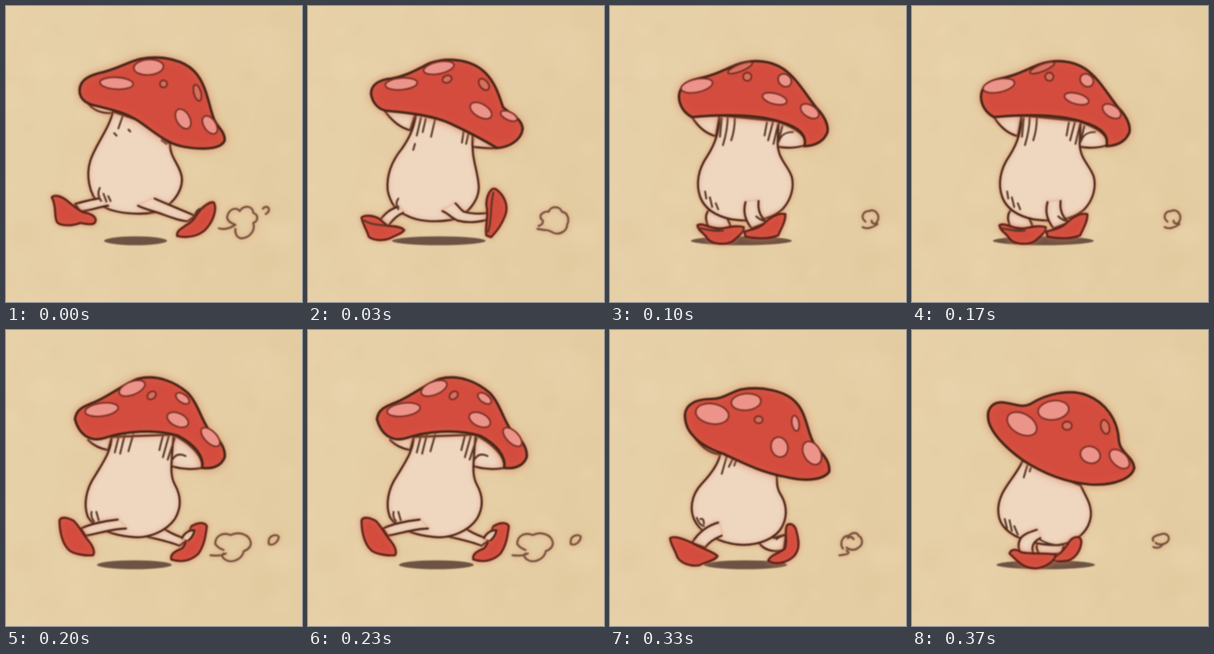
Write an HTML page with a canvas that moves like this. It is 498 px wide and 498 px high and loops after 410 ms.

```html
<!DOCTYPE html>
<html>
<head>
<meta charset="utf-8">
<title>Running mushroom</title>
<style>
html, body { margin: 0; width: 100%; height: 100%; overflow: hidden; background: #e6cfa6; }
canvas { display: block; filter: blur(.8px); }
</style>
</head>
<body>
<canvas id="stage" width="498" height="498"></canvas>
<script>
const SIZE = 498, LOOP = 410;
const INK = '#452417', RED = '#d44c3e', PINK = '#ec948a', SKIN = '#efd6bf';
const ctx = document.getElementById('stage').getContext('2d');
ctx.lineCap = ctx.lineJoin = 'round';

function shape(d, fill, width, ink = INK, glow = 0) {
  const path = new Path2D(d);
  ctx.save();
  ctx.shadowColor = 'rgba(218, 120, 84, .6)';
  ctx.shadowBlur = glow;
  if (fill) { ctx.fillStyle = fill; ctx.fill(path); }
  ctx.lineWidth = width;
  ctx.strokeStyle = ink;
  ctx.stroke(path);
  ctx.restore();
}
function oval(x, y, rx, ry, deg, fill, ink) {
  ctx.beginPath();
  ctx.ellipse(x, y, rx, ry, deg * Math.PI / 180, 0, 7);
  ctx.fillStyle = fill;
  ctx.fill();
  if (ink) { ctx.strokeStyle = ink; ctx.lineWidth = 2.8; ctx.stroke(); }
}
const shadow = (x, r) => oval(x, 395, r, 7.5, 0, '#6d5343');
const puff = d => shape(d, null, 3.4, '#71503c', 8);
const skin = d => shape(d, SKIN, 3.4, INK, 7);
const shoe = d => shape(d, RED, 3.6, '#5c2119', 10);
const cap = d => shape(d, RED, 4.2, INK, 13);
const lines = d => shape(d, null, 3.2, '#573526');
const spot = (x, y, rx, ry, deg = 0) => oval(x, y, rx - 1, ry - 1, deg, PINK, '#7c2f24');
const dot = (x, y, rx, ry, deg = 0) => oval(x, y, rx - 1, ry - 1, deg, '#d8705f', '#742d22');

function leap() {
  shadow(218, 53);
  puff('M372 355C375 340 388 338 393 345C400 335 415 335 416 348C426 352 424 362 416 365C420 378 410 390 396 391C388 390 385 382 386 375M358 374C370 378 380 372 386 368C380 366 372 362 372 355M432 341q6-6 10-1q2 6-5 10');
  skin('M138 164C148 176 160 181 178 180L184 174');
  skin('M180 178C174 205 150 235 142 260C134 285 140 318 158 334C180 350 225 352 250 347C275 340 297 315 296 290C294 268 275 255 276 232L230 195Z');
  skin('M222 336C230 340 240 343 250 346C270 352 290 362 306 362L318 353C300 345 275 335 250 324');
  skin('M155 324C140 326 128 330 116 333L125 345C140 345 155 338 172 336');
  shoe('M77 322C80 317 92 319 102 327C112 335 120 343 130 347C142 349 151 353 151 361C150 369 140 368 125 365C110 371 92 370 86 364C80 354 86 338 77 322Z');
  shoe('M350 331C355 340 350 358 340 371C328 388 305 391 288 387C286 378 296 374 304 368C318 362 320 348 332 338C340 332 346 328 350 331Z');
  lines('M318 354C318 344 326 340 332 340M196 186l-7 20M182 214l4 4M206 208l3 3M158 306q-6 10 2 22M164 316l5 13M172 320l4 8M262 226l8 6');
  cap('M124 146C122 128 134 119 156 113C185 107 205 94 226 89C265 82 300 92 317 110C336 130 340 160 348 185C353 203 369 210 368 226C363 240 335 243 300 237C270 232 250 212 222 193C200 179 180 175 152 168C136 165 126 158 124 146Z');
  spot(186, 130, 29, 11, 3);
  spot(240, 103, 26, 14, -4);
  dot(265, 131, 7, 7);
  dot(322, 146, 7, 15, -15);
  spot(298, 190, 12, 19, -30);
  spot(343, 200, 11, 18, -35);
}

function land() {
  shadow(220, 79);
  puff('M388 370C395 368 398 362 392 358C388 350 398 345 405 346C408 336 424 336 427 346C438 348 440 360 436 368C436 380 422 385 414 382C408 380 406 376 398 377L386 375');
  skin('M128 175C140 192 155 205 172 209L180 183');
  skin('M278 237C290 238 305 240 318 239L284 217');
  skin('M182 182C178 205 172 220 158 240C140 262 132 285 134 310C138 330 148 345 165 352C185 363 215 364 240 360C268 354 290 325 287 300C285 275 274 255 277 217L240 195Z');
  skin('M152 338C140 340 128 350 120 362L135 370C142 360 150 352 160 348');
  skin('M226 345C235 348 240 356 252 361C270 366 288 363 300 360L304 348C290 350 275 350 262 346C256 342 252 335 248 332');
  shoe('M90 356C95 351 110 352 120 358L134 370C145 370 158 372 162 377C158 384 145 386 138 391C125 396 108 394 102 388C100 378 92 368 90 356Z');
  shoe('M300 386C297 370 305 355 300 335C300 318 308 304 316 308C330 318 338 335 332 352C326 368 315 382 308 389Z');
  lines('M95 361C105 368 120 368 134 370M303 380C310 360 306 335 312 314M190 188l-7 30M180 232l-3 10M198 190l-5 22M214 190l-7 30M262 210l-3 20M270 214l-4 18M152 324q-6 8 0 18');
  cap('M106 148C106 132 120 124 140 122C165 118 185 106 205 96C240 84 278 92 298 112C316 130 322 152 328 170C340 182 362 190 361 208C358 226 338 238 318 239C300 228 270 212 240 198C205 182 165 180 130 176C115 172 108 160 106 148Z');
  spot(157, 131, 28, 11, -5);
  spot(220, 104, 27, 11, -12);
  dot(234, 123, 9, 7, -20);
  dot(296, 132, 8, 12, -40);
  spot(291, 176, 21, 12, 30);
  spot(338, 185, 16, 8, 25);
}

function gather() {
  shadow(221, 85);
  puff('M430 363C421 356 425 345 436 345C446 340 455 352 450 362C447 369 440 366 440 361M450 367C442 373 432 376 425 372');
  skin('M138 187C148 203 162 215 178 219L184 186');
  skin('M284 237C300 240 318 238 328 234C332 216 308 204 278 193');
  skin('M165 345C160 352 160 360 166 372L204 376C202 366 200 362 196 356');
  skin('M184 184C184 210 178 230 164 252C148 275 144 300 152 322C160 342 180 354 205 359C240 364 270 360 290 342C305 326 310 305 306 288C300 268 282 258 282 230L284 194Z');
  skin('M228 330C224 345 226 358 238 374L264 364C254 356 248 345 250 328');
  shoe('M147 369C154 364 165 372 182 375C198 373 212 368 225 372C227 380 215 388 206 396C192 403 170 401 163 390C158 382 148 378 147 369Z');
  shoe('M226 380C235 376 247 376 258 367C267 358 282 347 295 350C296 362 288 374 283 386C268 392 245 392 228 388Z');
  lines('M150 374C164 376 176 380 190 378M262 362q-10-2-16-8M188 188l-3 32M198 186q0 22-8 48M210 188q0 20-6 38M264 196l-4 22M274 196l-8 30M283 198l-8 34M290 202l-6 24M284 228C288 216 296 212 308 212M168 322l4 16M178 332l4 10M160 312l2 12');
  cap('M116 152C117 135 128 126 148 122C172 118 190 108 212 99C240 88 272 92 292 106C315 122 330 150 348 172C360 184 368 200 366 212C360 228 345 235 327 236C332 218 318 204 290 196C250 182 190 182 138 187C124 180 116 166 116 152Z');
  spot(146, 134, 28, 12, -12);
  dot(219, 104, 23, 7, -22);
  dot(231, 119, 8, 8);
  spot(294, 125, 13, 11, 40);
  spot(277, 156, 22, 10, 15);
  spot(336, 177, 18, 11, 32);
}

function bound() {
  shadow(216, 63);
  puff('M352 360C352 345 366 340 378 345C392 338 410 344 412 358C412 366 406 370 400 372C398 384 384 392 372 388C364 384 362 380 366 376M352 360C356 366 360 368 366 370M344 379C355 380 362 380 370 376M442 355C442 346 456 342 459 348C458 356 450 364 442 360Z');
  skin('M138 185C148 195 160 200 172 202L178 179');
  skin('M278 229C295 234 315 235 330 232C332 210 305 188 280 176');
  skin('M238 348C255 352 275 356 292 363L306 352C290 348 278 342 268 336');
  skin('M178 180C176 205 165 220 150 245C134 268 130 295 138 315C150 335 180 345 210 348C240 352 270 338 284 318C296 298 294 278 284 260C276 245 278 230 280 200L282 176Z');
  skin('M188 319C170 321 145 325 126 334L134 346C155 343 178 334 202 334');
  shoe('M90 320C93 313 105 316 114 321C125 332 130 345 140 356C148 366 150 376 146 379C135 380 118 378 108 372C95 362 90 340 90 320Z');
  shoe('M278 386C276 378 284 372 295 368C304 362 304 345 312 330C322 324 334 322 338 330C336 345 334 362 324 376C312 388 295 392 278 386Z');
  skin('M296 350C300 342 308 336 317 337C316 344 312 350 307 354');
  lines('M190 178l-7 28M200 176l-8 32M214 176l-8 28M264 178l-6 24M274 178l-10 36M284 182l-12 36M280 218C286 208 294 208 302 212M144 306q-2 8 4 16M152 306l4 14');
  cap('M116 150C118 132 132 128 152 120C178 108 200 90 222 82C255 74 285 88 305 105C322 122 328 148 340 166C356 180 370 198 368 214C362 230 346 234 330 232C334 212 316 192 290 178C250 166 200 170 165 182C145 188 124 180 116 150Z');
  spot(161, 134, 29, 12, -8);
  spot(212, 98, 24, 12, -22);
  dot(245, 110, 9, 7, -40);
  spot(297, 115, 14, 8, 35);
  spot(289, 151, 20, 12, 25);
  spot(344, 180, 21, 11, 45);
}

function step() {
  shadow(228, 70);
  puff('M386 379C398 378 406 376 398 371M392 368C386 360 390 346 402 346C408 340 416 340 418 346C426 350 426 362 418 366C412 372 402 370 398 366M400 350q6-4 10 2');
  skin('M142 180C152 195 166 206 182 209L188 204');
  skin('M250 357C258 370 275 375 292 370L296 344L275 350');
  skin('M186 206C184 222 172 240 155 258C136 278 132 305 145 325C155 342 185 358 215 361C250 364 280 350 290 330C300 310 296 290 286 275C279 262 282 255 280 243L230 225Z');
  skin('M182 324C168 328 150 338 138 358L160 366C168 355 178 350 188 346');
  shoe('M101 350C108 346 120 350 138 358C150 366 172 372 181 380C178 388 160 390 150 396C135 398 120 393 113 382C110 370 102 362 101 350Z');
  shoe('M266 388C270 378 284 376 294 368C300 355 292 338 298 328C304 324 312 328 314 340C318 355 320 368 310 380C298 392 278 396 266 388Z');
  lines('M196 214l-8 28M206 218l-6 12M212 220l-3 8M146 316q4 12 12 14M152 318q6-2 6 8M280 352q8-6 14-6');
  cap('M126 142C128 124 146 116 170 116C190 116 200 106 220 100C255 94 295 102 313 122C332 142 332 175 344 192C356 208 370 218 369 238C360 252 330 256 295 247C255 240 220 222 190 208C165 200 148 188 140 178C130 168 126 155 126 142Z');
  spot(172, 141, 29, 18, 10);
  spot(229, 121, 26, 15, -5);
  dot(250, 151, 8, 7);
  spot(312, 157, 7, 14, -10);
  spot(285, 197, 15, 18, -15);
  spot(340, 207, 15, 22, -30);
}

function tuck() {
  shadow(225, 83);
  puff('M406 355C402 348 412 345 418 344C428 340 436 348 430 356C424 362 414 362 410 358M422 361C418 366 412 368 406 365');
  skin('M214 352C208 360 208 370 216 378L252 376L256 358');
  skin('M186 220C178 240 162 255 152 275C142 295 142 320 158 335C175 352 210 362 245 362C275 358 298 340 301 312C302 292 292 280 284 262L230 240Z');
  skin('M210 336C198 340 186 344 182 352C178 360 178 368 184 378L204 376C200 364 204 356 216 350');
  shoe('M236 386C244 380 256 372 266 354C274 346 284 346 285 356C284 370 276 384 262 388C250 390 244 390 236 386Z');
  shoe('M164 376C166 368 176 368 184 374C205 378 225 374 242 378C240 388 228 398 210 401C190 402 180 392 164 376Z');
  lines('M194 228l-6 20M200 232l-2 6M156 318l4 16M164 320l4 18M172 330l6 14M214 352q16 10 36 10');
  cap('M128 148C126 130 138 120 155 122C172 124 185 132 200 124C225 108 265 98 295 110C325 122 346 150 348 185C350 208 372 212 374 232C370 250 340 262 300 260C255 256 215 238 185 218C160 200 130 172 128 148Z');
  spot(185, 158, 28, 18, 30);
  spot(238, 135, 27, 17, -8);
  dot(261, 161, 9, 8);
  dot(325, 163, 8, 13, -15);
  spot(300, 210, 18, 15, 20);
  spot(349, 217, 21, 13, 42);
}

// Old paper: warm gradient with soft seeded blotches.
function paper() {
  const wash = ctx.createLinearGradient(0, 0, SIZE, SIZE * .3);
  wash.addColorStop(0, '#e7d1a9');
  wash.addColorStop(1, '#e5cda3');
  ctx.fillStyle = wash;
  ctx.fillRect(0, 0, SIZE, SIZE);
  let seed = 7;
  const random = () => (seed = seed * 16807 % 2147483647) / 2147483647;
  for (let i = 0; i < 90; i++) {
    const x = random() * SIZE, y = random() * SIZE, r = 12 + random() * 30;
    const tone = i % 2 ? '240, 220, 184' : '218, 192, 146';
    const blot = ctx.createRadialGradient(x, y, 0, x, y, r);
    blot.addColorStop(0, `rgba(${tone}, .15)`);
    blot.addColorStop(1, `rgba(${tone}, 0)`);
    ctx.fillStyle = blot;
    ctx.fillRect(x - r, y - r, 2 * r, 2 * r);
  }
}

function poseAt(t) {
  if (t < 30) return leap;
  if (t < 100) return land;
  if (t < 200) return gather;
  if (t < 270) return bound;
  return t < 340 ? step : tuck;
}

let shown;
function tick() {
  const pose = poseAt(performance.now() % LOOP);
  if (pose !== shown) {
    shown = pose;
    paper();
    pose();
  }
  requestAnimationFrame(tick);
}
tick();
</script>
</body>
</html>
```
